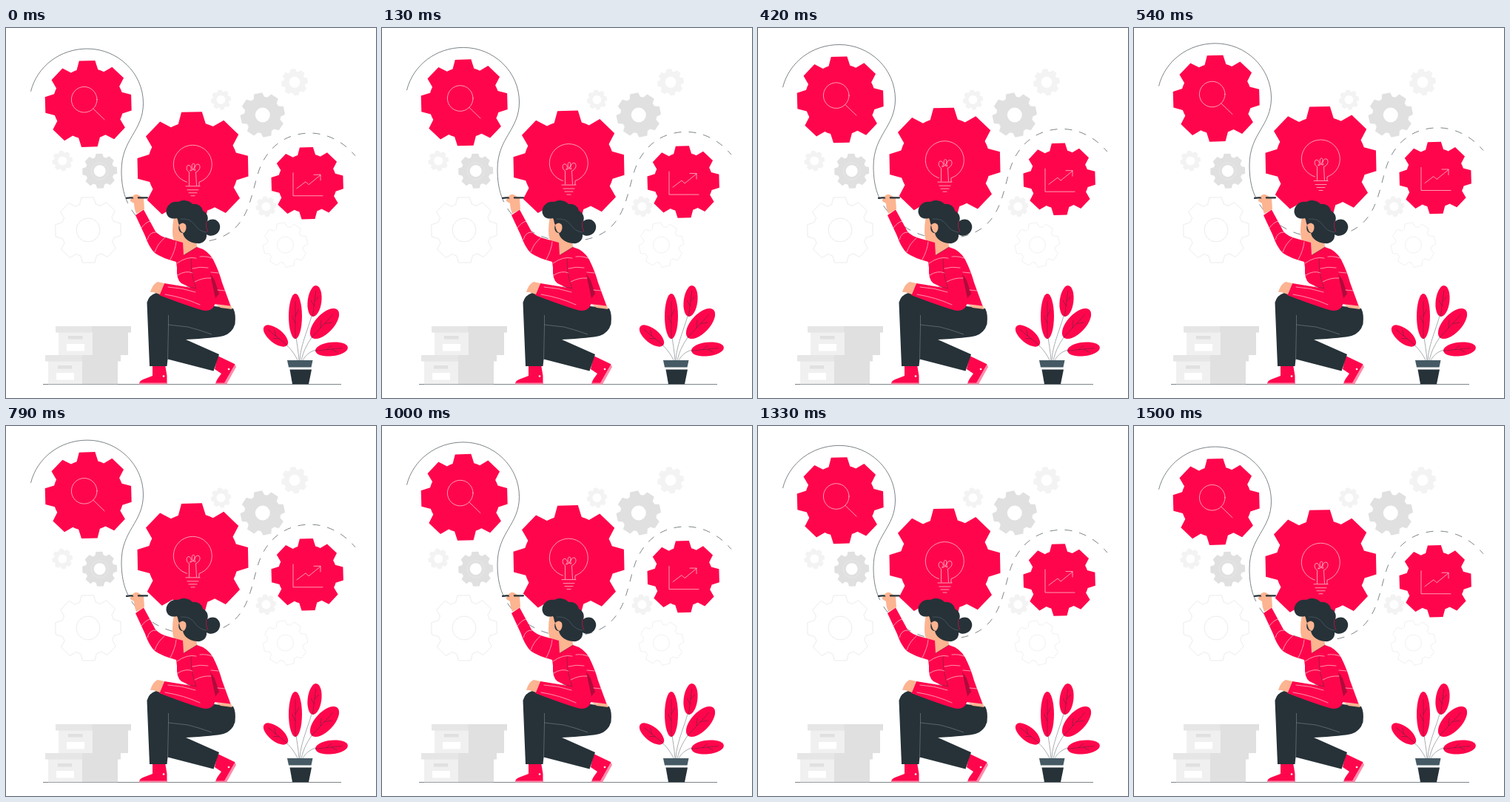
Animation, 500 px wide and 500 px high, one loop 1.54 s. Source, as an HTML page:

```html
<!DOCTYPE html>
<html lang="en">
<head>
<meta charset="utf-8">
<title>Idea gears</title>
<style>
  html, body { margin: 0; width: 100%; height: 100%; overflow: hidden; background: #fff; }
  svg { display: block; width: 100vw; height: 100vh; }
  .red { fill: #ff064c; }
  .dark { fill: #263238; }
  .skin { fill: #fcb491; }
  .front { fill: #f0f0f0; }
  .lid { fill: #e6e6e6; }
  .side { fill: #e0e0e0; }
  .white { fill: #fff; }
  .line, .thin, .ink, .stem { fill: none; stroke-linecap: round; stroke-linejoin: round; }
  .line { stroke: #fff; stroke-width: .6; }
  .thin { stroke: #ffd0dc; stroke-width: .7; }
  .ink { stroke: #263238; stroke-width: .6; stroke-linecap: butt; }
  .stem { stroke: #263238; stroke-width: .4; }
</style>
</head>
<body>
<svg viewBox="0 0 500 500">
  <g id="still"></g>

  <g id="float">
    <g id="gears"></g>
    <path class="ink" d="M33.5 86C42 52 73 28.3 110 28.3C151 28.3 185.5 61 185.5 102C185.5 140 156 150 156 193C156 208 158 219 161 228"/>
    <path class="ink" stroke-dasharray="10 10" d="M161 228C171 258 205 292 256 290C335 287 328 222 345 185C358 157 382 142.3 411 142.3C435 142.3 457 155 472 173"/>
    <g class="line">
      <circle cx="105.7" cy="97" r="17.3"/>
      <path d="M118 109.500L133 124"/>
      <path d="M244.500 208.500C234 205 226.300 196 226.300 184.500A26 26 0 0 1 278.300 184.500C278.300 196 271 205 261 208.500V213.500"/>
      <path d="M243 214H262M245 219H260M247 223H258M250 227H255"/>
      <path d="M247.500 213V195C242 192 244 184 248 186C251 188 251 193 248.500 193C254 194 257 184 253.500 183.500C250 183 250 193 256 192.500C253 190 257 182 261 185C264 189 260 194 256.500 195L257.500 213"/>
      <path d="M388 196V227H428M393 217L405 208L409 212L425 199M416 198.500H425V206"/>
    </g>
  </g>

  <path class="ink" d="M50 481.500H453"/>

  <!-- boxes -->
  <path class="side" d="M115 403H169V411.500H165V442H117V411.500H115Z"/>
  <path class="front" d="M71 411H117V442H71Z"/>
  <path class="lid" d="M67 403H116V411.500H67Z"/>
  <path class="side" d="M103 442H155V450.500H151V481.300H103Z"/>
  <path class="front" d="M57 450H103V481.300H57Z"/>
  <path class="lid" d="M53 442H103V450.500H53Z"/>
  <path class="side" d="M84 416H103.500V420.500H84ZM70 456H89V460.500H70Z"/>
  <path class="white" d="M82 427H106V436.500H82ZM68 466H92V475.500H68Z"/>

  <!-- plant -->
  <path class="stem" d="M396 449C395 436 393 425 391 412M397 449C398 425 412 400 415 380M399 449C402 436 408 424 418 412M401 449C406 440 414 435 424 434M394 449C390 440 383 431 376 426"/>
  <g id="leaves"></g>
  <path class="dark" d="M383.500 461.500H413L409 481.300H387Z"/>
  <path fill="#455a64" d="M380 449H414.500L412.500 458.500H382Z"/>

  <!-- legs and boots -->
  <path class="red" d="M198 455H215L217.500 470V481H180Q180 477 185 475L198 470Z"/>
  <path class="red" d="M286 443L309 454L310.500 458L296 481H283Q284 477 286 474L291 467L282 461Z"/>
  <path fill="#ff8cab" d="M180 479.500H217.500V481.500H180ZM309 455L311 458L298 481.500H283V479.500H295Z"/>
  <circle class="white" cx="213" cy="470.500" r="1.300"/>
  <circle class="white" cx="301" cy="461" r="1.300"/>
  <path class="dark" d="M190.500 371Q193 361 203 358Q213 356 225 361L265 374L307 379Q311 386 309.500 400Q306 412 294 416Q282 419 243 421L288 441L280.500 463.500L218.500 447.500L217.500 457H194Z"/>
  <path fill="none" stroke="#8b969b" stroke-width=".5" d="M218.500 447L219.500 403V388M219.500 401L246 404Q262 408 278 414"/>

  <!-- head -->
  <path class="skin" d="M227 254Q225 265 225 274Q225 287 229 289L238 290V312L258 297L256 260Z"/>
  <path class="dark" d="M216.500 249C216 240 224 233 233 235C240 231 249 234 252 238C259 237 265 241 266 247C272 250 274 256 272 261C282 254 291 263 289 271C287 280 277 283 271 279C272 287 265 292 258 291C247 290 240 284 239 277C234 277 232 271 234 266C232 263 233 260 231 257C223 259 218 256 216.500 249Z"/>
  <path class="skin" d="M234 266Q239 261 243 266Q245 273 240 277Q235 276 234 266Z"/>
  <path fill="none" stroke="#60717a" stroke-width=".5" d="M236 258Q249 257 255 266T271 276"/>
  <path fill="none" stroke="#ff064c" stroke-width=".6" d="M271 261Q269 269 273 276"/>

  <!-- jumper -->
  <path class="skin" d="M284 374L304 375L305.500 380L290 378Z"/>
  <path class="red" d="M175 253L186 245.500L202 275Q208 282 221 285L239 290L240 307L258 296Q273 300 280 313Q288 329 292 344L303.500 375.500L281 373L256 354L237 345Q230 340 231 324L230 316Q211 311 201 304Q193 296 188 281Z"/>
  <path fill="#b00a3c" d="M276 332L282 341L288 359L281 368Z"/>
  <path class="red" d="M250 312Q268 306 274 324L283 365Q284 382 269 382Q260 381 207 361L214 345L257 352Z"/>
  <path class="thin" d="M183 270Q189 262 195 261M191 286Q194 275 203 276M201 303Q205 291 214 284M222 313Q229 300 230 289M231 318Q245 308 257 311M232 334Q243 327 252 331M252 325Q262 322 273 324M255 343Q266 337 277 338M219 350Q238 351 256 357M215 360Q240 364 262 374M262 309Q272 308 278 311M277 330L287 331M286 354L296 355"/>
  <path class="stem" d="M240 307L258 296M250 312Q250 335 257 352L244 349"/>

  <!-- hands and pen -->
  <path class="skin" d="M195 357Q198 346 205 343L214 345L208 360L199 357Z"/>
  <path class="skin" d="M168 232Q172 224 178 225L186 230L187 245L176 251Q173 243 173 237L168 234Z"/>
  <path d="M163 229.800L168 229.300H191" fill="none" stroke="#263238" stroke-width="2.200" stroke-linecap="round"/>
  <path class="skin" d="M171 228Q174 224 177 225L179 234L175 235Z"/>
</svg>
<script>
  const $ = id => document.getElementById(id);

  // Eight tapered teeth around a round body
  function gearPath(x, y, R, turn = 0, hole = 0) {
    const r = R * .81;
    const at = (deg, rad) => {
      const a = (deg + turn - 90) * Math.PI / 180;
      return `${(x + rad * Math.cos(a)).toFixed(2)} ${(y + rad * Math.sin(a)).toFixed(2)}`;
    };
    let d = '';
    for (let k = 0; k < 360; k += 45) {
      d += `${k ? `A${r} ${r} 0 0 1 ` : 'M'}${at(k - 17.5, r)}L${at(k - 10.5, R)}L${at(k + 10.5, R)}L${at(k + 17.5, r)}`;
    }
    d += `A${r} ${r} 0 0 1 ${at(-17.5, r)}Z`;
    if (hole) d += `M${x - hole} ${y}a${hole} ${hole} 0 1 0 ${2 * hole} 0a${hole} ${hole} 0 1 0 ${-2 * hole} 0Z`;
    return d;
  }

  const gear = (style, ...dims) => `<path fill-rule="evenodd" ${style} d="${gearPath(...dims)}"/>`;
  const flat = c => `fill="${c}"`;
  const outline = c => `fill="none" stroke="${c}" stroke-width=".8"`;
  const pale = flat('#f3f3f3'), grey = flat('#e0e0e0');

  $('still').innerHTML =
    gear(grey, 346.8, 117.5, 30.3, -12, 10) +
    gear(pale, 390, 73.3, 18.2, -8, 7.5) +
    gear(pale, 290.5, 97, 13.8, -8, 6) +
    gear(pale, 76.3, 179.5, 14, -8, 6) +
    gear(grey, 126.7, 193.2, 23.8, -2, 8) +
    '<circle cx="126.7" cy="193.2" r="11.5" fill="none" stroke="#ebebeb" stroke-width=".6"/>' +
    gear(pale, 351.5, 241.3, 14, -8, 6) +
    gear(outline('#e6e6e6'), 111, 273, 44.8, -1, 16) +
    gear(outline('#ececec'), 377.5, 293, 30.3, -12, 11);

  const red = 'class="red"';
  $('gears').innerHTML =
    gear(red, 111.2, 102.7, 59.2, -1.6) +
    gear(red, 252.5, 188.5, 76, -1.2) +
    gear(red, 407.2, 210, 49.3, -1.6);

  const leaf = (x, y, rx, ry, turn) =>
    `<g transform="translate(${x} ${y}) rotate(${turn})"><ellipse class="red" rx="${rx}" ry="${ry}"/>` +
    `<path class="stem" d="M0 ${ry}V${-ry * .65}M0 ${ry * .3}L${-rx * .5} 0M0 0L${rx * .5} ${-ry * .3}"/></g>`;

  $('leaves').innerHTML =
    leaf(391, 389.5, 9, 30.5, 0) +
    leaf(417, 369, 9.3, 21, 7) +
    leaf(430.5, 399.5, 12.5, 25.5, 43) +
    leaf(440, 434, 9.3, 22, 84) +
    leaf(364.5, 416, 9.5, 20, -51);

  // Linear bob of 10 units every 1.5 s, shown at 24 steps per second
  const LOOP = 1540, STEP = 1000 / 24, BOB = 1500, LEAD = 20;
  const start = performance.now();

  function draw(now) {
    const time = Math.max(0, now - start) % LOOP;
    const shown = Math.min(36, Math.floor((time + 5) / STEP)) * STEP;
    const phase = (shown + LEAD) % BOB / BOB;
    const lift = 10 * (1 - Math.abs(1 - 2 * phase));
    $('float').setAttribute('transform', `translate(0 ${-lift.toFixed(3)})`);
    requestAnimationFrame(draw);
  }
  draw(start);
</script>
</body>
</html>
```
